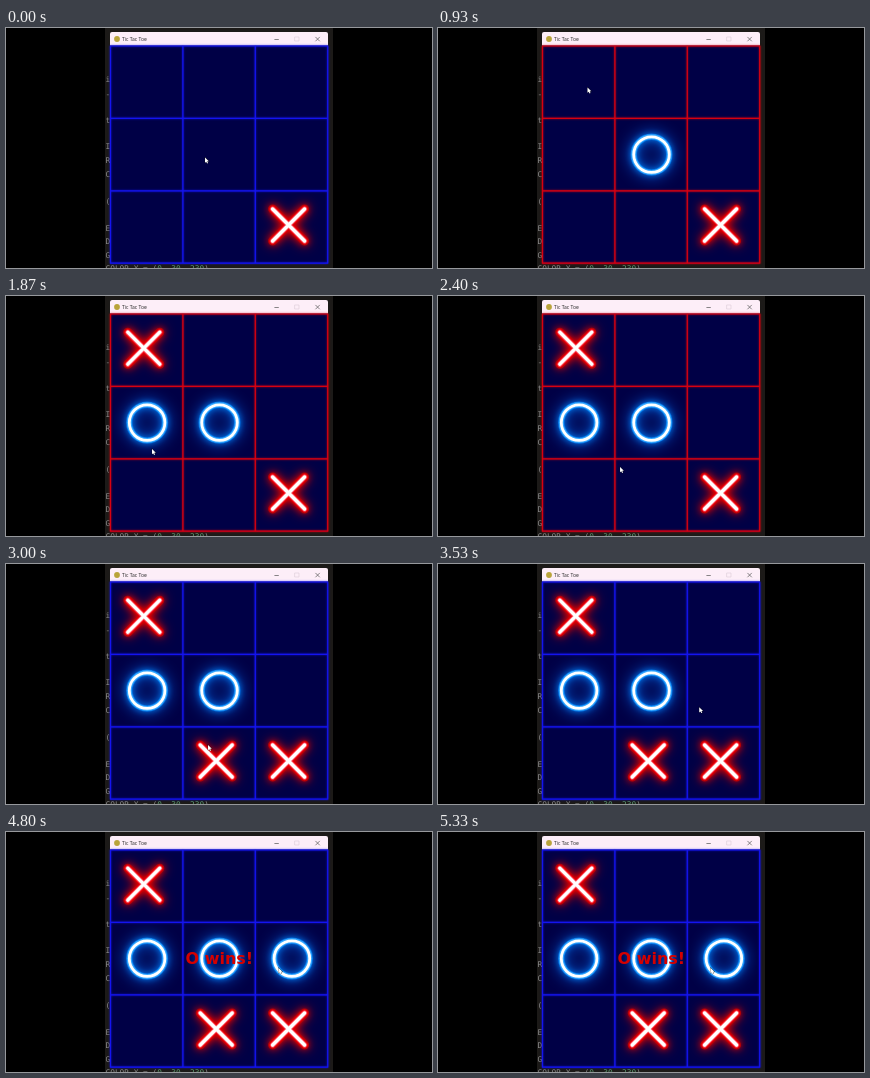
Recreate the animation shown at these times as an HTML page with a canvas. Size 426x240 px, loop 5.39 s.

```html
<!DOCTYPE html>
<html>
<head>
<meta charset="utf-8">
<style>
html, body { margin: 0; width: 100%; height: 100%; overflow: hidden; background: #000; }
canvas { display: block; width: 426px; height: 240px; }
</style>
</head>
<body>
<canvas id="stage" width="426" height="240"></canvas>
<script>
const ctx = document.getElementById('stage').getContext('2d');
const LOOP = 5390, STEP = 200 / 3;
const LEFT = 104.5, TOP = 18, CELL = 72.4;

// time, mark, column, row
const moves = [
  [0, 'X', 2, 2], [330, 'O', 1, 1], [1130, 'X', 0, 0],
  [1730, 'O', 0, 1], [2730, 'X', 1, 2], [3730, 'O', 2, 1]
];
const WIN = 3730;

// time, x, y of the pointer tip
const pointer = [
  [0, 199, 129.5], [260, 199, 129.5], [870, 149.5, 59.5], [1200, 149.5, 59.5],
  [1740, 146, 153], [2000, 146, 153], [2670, 202, 181],
  [3130, 202, 181], [3670, 272.5, 136], [LOOP, 272.5, 136]
];

function rect(color, x, y, w, h) {
  ctx.fillStyle = color;
  ctx.fillRect(x, y, w, h);
}

function text(str, x, y, font, color) {
  ctx.font = font;
  ctx.fillStyle = color;
  ctx.fillText(str, x, y);
}

function stroke(path, color, width, glow, blur) {
  ctx.save();
  ctx.lineCap = 'round';
  ctx.strokeStyle = color;
  ctx.lineWidth = width;
  if (glow) {
    ctx.shadowColor = glow;
    ctx.shadowBlur = blur;
  }
  ctx.stroke(path);
  ctx.restore();
}

function drawEditor() {
  rect('#000', 0, 0, 426, 240);
  rect('#1c1a18', 99, 0, 228, 240);
  const mono = '7.8px "DejaVu Sans Mono", monospace';
  const letters = [['i', 54], ['-', 69], ['t', 95], ['I', 121], ['R', 135],
    ['C', 149], ['(', 176], ['E', 203], ['D', 216], ['G', 230]];
  for (const [letter, y] of letters) text(letter, 99.5, y, mono, '#8a8a8a');
  text('COLOR_X = (', 99.5, 242.5, mono, '#8a8a8a');
  text('0, 30, 230', 151.2, 242.5, mono, '#5c9a70');
  text(')', 198.2, 242.5, mono, '#8a8a8a');
}

function drawWindow() {
  ctx.fillStyle = '#fdeef8';
  ctx.beginPath();
  ctx.roundRect(104, 4, 218, 16, 2);
  ctx.fill();
  ctx.fillStyle = '#b9a43a';
  ctx.beginPath();
  ctx.arc(111, 11, 2.9, 0, 7);
  ctx.fill();
  text('Tic Tac Toe', 116, 13, '5px "Open Sans", sans-serif', '#222');
  stroke(new Path2D('M268.8 11.5h3.6M309.7 9.2l3.8 3.8m0-3.8l-3.8 3.8'), '#555', 0.7);
  stroke(new Path2D('M289 9h4v4h-4z'), '#e0d0dc', 0.7);
  rect('#000046', 104, 17.5, 218, 218.5);
}

function drawGrid(color) {
  const grid = new Path2D();
  for (let i = 0; i < 4; i++) {
    const d = i * CELL, end = 3 * CELL;
    grid.moveTo(LEFT + d, TOP);
    grid.lineTo(LEFT + d, TOP + end);
    grid.moveTo(LEFT, TOP + d);
    grid.lineTo(LEFT + end, TOP + d);
  }
  stroke(grid, color, 1.2, color, 2);
}

function drawMark(mark, col, row) {
  const x = LEFT + (col + 0.5) * CELL + 0.4, y = TOP + (row + 0.5) * CELL;
  const path = new Path2D();
  if (mark === 'O') {
    path.arc(x, y, 17.8, 0, Math.PI * 2);
    stroke(path, '#0060d0', 6.5, '#0070ff', 16);
    stroke(path, '#36a8ff', 5, '#0088ff', 6);
    stroke(path, '#fff', 2.8);
  } else {
    const cx = x - 3.3, cy = y - 2, r = 16;
    path.moveTo(cx - r, cy - r);
    path.lineTo(cx + r, cy + r);
    path.moveTo(cx + r, cy - r);
    path.lineTo(cx - r, cy + r);
    stroke(path, '#a00008', 9, '#c80000', 12);
    stroke(path, '#f00010', 6.5, '#f00000', 6);
    stroke(path, '#ff6068', 4.8);
    stroke(path, '#fff', 3.3);
  }
}

function drawPointer(t) {
  const i = pointer.findIndex(p => p[0] > t);
  const [t0, x0, y0] = pointer[i - 1], [t1, x1, y1] = pointer[i];
  const u = (t - t0) / (t1 - t0), ease = u * u * (3 - 2 * u);
  ctx.save();
  ctx.translate(x0 + (x1 - x0) * ease, y0 + (y1 - y0) * ease);
  const arrow = new Path2D('M0 0v5.2l1.2-1 .9 1.7.9-.4-.8-1.7h1.6z');
  stroke(arrow, '#111', 0.5);
  ctx.fillStyle = '#fff';
  ctx.fill(arrow);
  ctx.restore();
}

function draw(now) {
  const t = Math.floor((now % LOOP + 5) / STEP) * STEP;
  const played = moves.filter(m => m[0] <= t);
  const redTurn = t < WIN && played[played.length - 1][1] === 'O';
  drawEditor();
  drawWindow();
  for (const [, mark, col, row] of played) drawMark(mark, col, row);
  drawGrid(redTurn ? '#d80010' : '#1414f0');
  if (t >= WIN) text('O wins!', 179.5, 132, 'bold 16px "DejaVu Sans", sans-serif', '#d40000');
  drawPointer(Math.min(t, LOOP - 1));
}

const start = performance.now();
function tick() {
  draw(performance.now() - start);
  requestAnimationFrame(tick);
}
tick();
</script>
</body>
</html>
```
